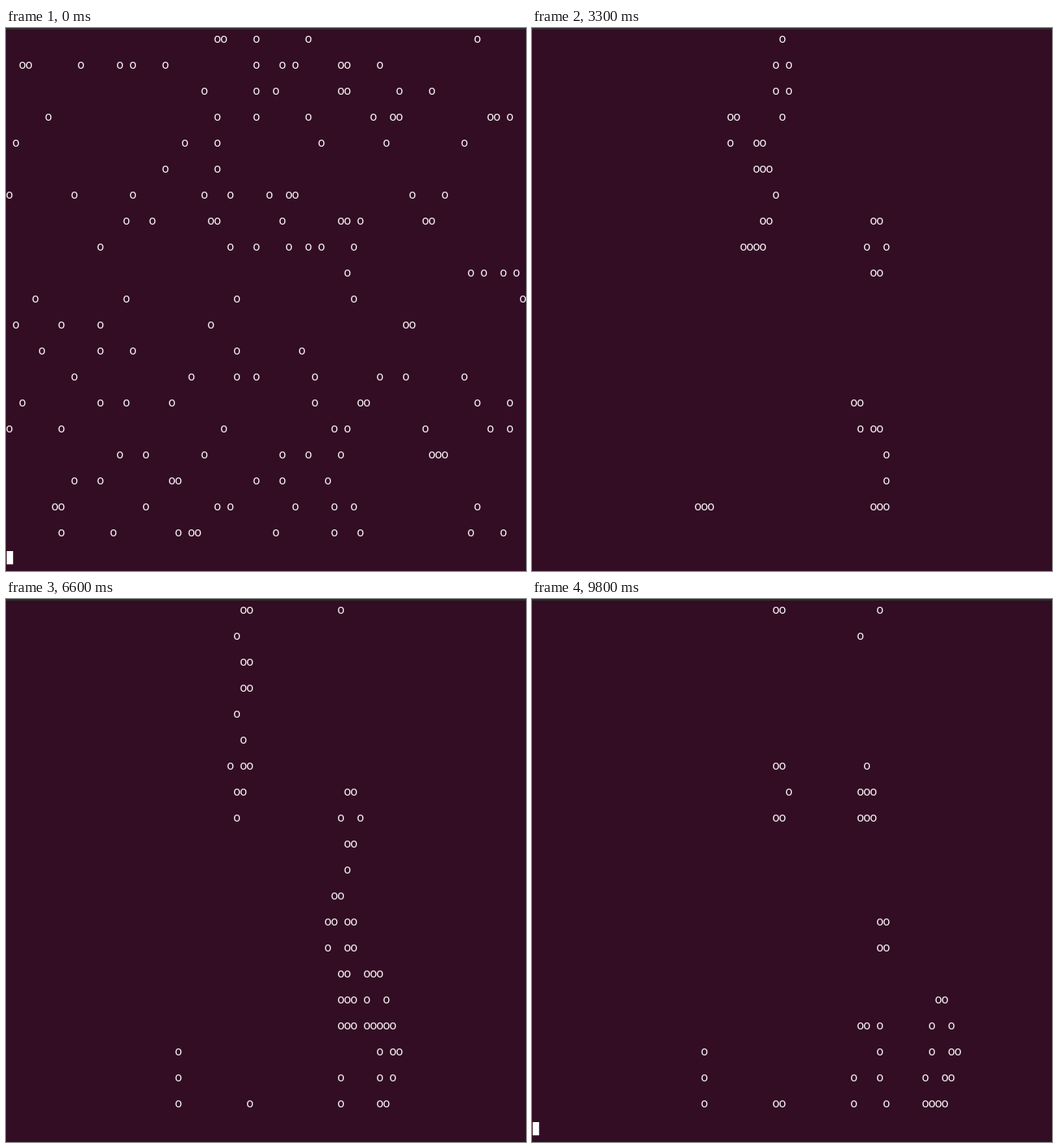
An HTML page with a canvas that plays this animation: 600x627 px, repeating every 9900 ms.

```html
<!DOCTYPE html>
<html lang="en">
<head>
<meta charset="utf-8">
<title>Game of Life in a terminal</title>
<style>
  html, body { margin: 0; width: 100%; height: 100%; overflow: hidden; background: #320d24; }
  canvas { display: block; }
</style>
</head>
<body>
<canvas id="stage" width="600" height="627"></canvas>
<script>
const COLS = 80, ROWS = 20;
const CELL_W = 7.5, ROW_H = 30;
const LOOP = 9900, TICK = 100;
const GENERATION = 309, HEAD_START = 211;
const BLINK = 1200, BLINK_SHIFT = 200;

// One line per row; bars mark every tenth column, trailing blanks are left out.
const SEED = `
|||..oo....o|......o|||..o
..oo|.o.....o.o|....o|........o|..o.o|.oo....o
|||o.......o|.o|.oo|o....o
......o|||..o.....o|......o|......o..o|o|....oo.o
.o||.......o|..o|........o|........o||o
||....o|..o
o|o........o||o...o|o..oo||..o....o
|........o|..o|.oo|..o|.oo.o|....oo
|....o||....o...o|...o..o.o|...o
|||||..o||.o.o..o.o
....o|........o||.....o||...o||.........o
.o......o|....o||.o|||.oo
.....o|....o....o||.....o|.....o
|o|........o|.....o..o|.......o|.......o|.o|o
..o|....o...o|.....o||.......o|....oo||..o....o
o.......o|||...o||o.o|....o|....o..o
|.......o|.o|o|..o...o|.o|.....ooo
|o...o|.....oo|........o|..o......o
.......oo||.o|..o.o|....o|o..o||..o
........o|......o|......o.oo||.o|o...o||.o....o`;

const parseRow = line => {
  const text = line.split('|').map(block => block.padEnd(10, '.')).join('').padEnd(COLS, '.');
  return [...text].map(ch => ch === 'o' ? 1 : 0);
};

// The board is closed on itself in both directions.
function neighbours(board, r, c) {
  let sum = -board[r][c];
  for (let dr = -1; dr <= 1; dr++) {
    const row = board[(r + dr + ROWS) % ROWS];
    for (let dc = -1; dc <= 1; dc++) sum += row[(c + dc + COLS) % COLS];
  }
  return sum;
}

const evolve = board => board.map((row, r) => row.map((alive, c) => {
  const n = neighbours(board, r, c);
  return n === 3 || (alive && n === 2) ? 1 : 0;
}));

const generationAt = t => Math.floor((t + HEAD_START) / GENERATION);

const boards = [SEED.trim().split('\n').map(parseRow)];
while (boards.length <= generationAt(LOOP)) boards.push(evolve(boards[boards.length - 1]));

const ctx = document.getElementById('stage').getContext('2d');

function draw(t) {
  ctx.fillStyle = '#320d24';
  ctx.fillRect(0, 0, 600, 627);
  ctx.fillStyle = '#2d2b2a';
  ctx.fillRect(0, 0, 600, 2);

  ctx.fillStyle = '#fbf5f9';
  ctx.font = '14px "Noto Sans", "Open Sans", sans-serif';
  ctx.textAlign = 'center';
  boards[generationAt(t)].forEach((row, r) => row.forEach((alive, c) => {
    if (alive) ctx.fillText('o', c * CELL_W + 4.1, r * ROW_H + 16.5);
  }));

  if ((t + BLINK_SHIFT) % BLINK < BLINK / 2) {
    ctx.fillStyle = '#fff';
    ctx.fillRect(0.8, 604, 7.4, 15.3);
  }
}

const start = performance.now();

function frame() {
  const t = (performance.now() - start) % LOOP;
  draw(Math.floor(t / TICK) * TICK);
  requestAnimationFrame(frame);
}
frame();
</script>
</body>
</html>
```
